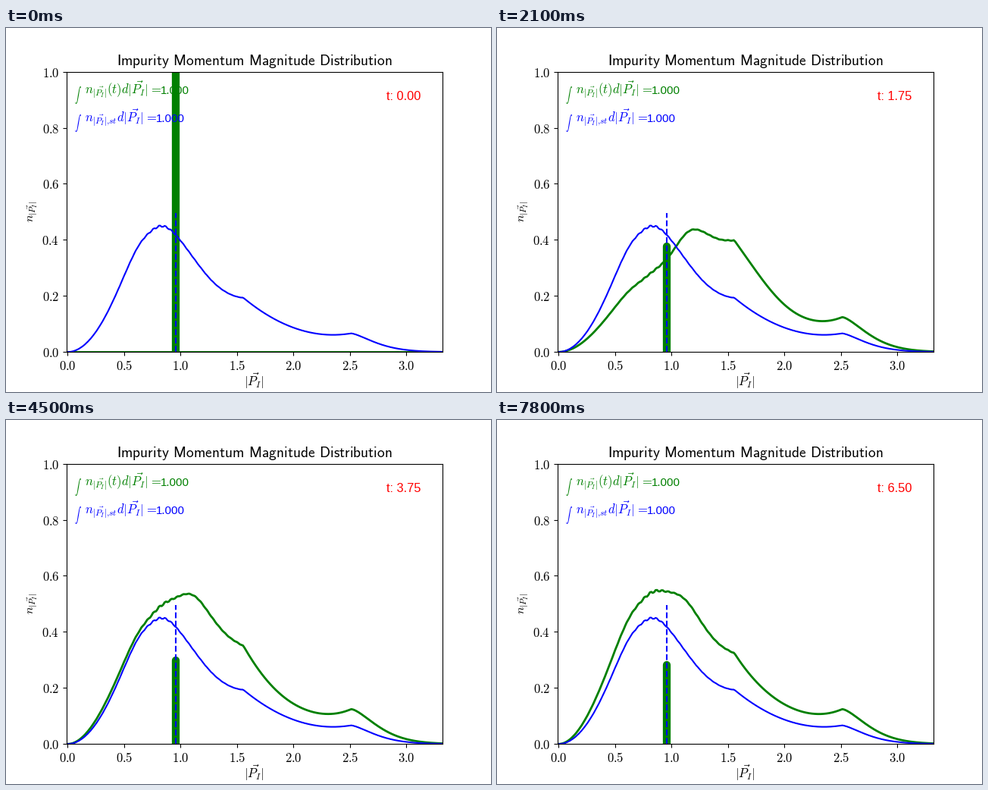
A matplotlib script for the animation above (8 s loop, 640 by 480 pixels).

```python
import matplotlib.pyplot as plt
import numpy as np
from matplotlib.animation import FuncAnimation

plt.rcParams.update({"mathtext.fontset": "cm", "font.size": 12})

INTERVAL = 100      # ms per animation frame
HOLD = 3            # animation frames per time step
STEP = 0.25         # simulated time per step
FRAMES = 80
PEAK = 0.955        # momentum of the coherent peak
KINK, BUMP, X_MAX = 1.56, 2.51, 3.32


def sigmoid(x):
    return 1 / (1 + np.exp(-x))


def bell(x, center, width):
    return np.exp(-((x - center) / width) ** 2)


def steady(x):
    """Stationary distribution: broad peak, kink, valley and cut-off tail."""
    peak = 1.15 * x ** 2 / (1 + (x / 0.88) ** 5)
    peak += 0.042 * (np.maximum(x - 1.2, 0) / (KINK - 1.2)) ** 2
    peak -= 0.012 * bell(x, 0.73, 0.1)
    valley = 0.061 + 0.21 * (np.minimum(x, BUMP) - 2.35) ** 2
    tail = np.exp(-6.2 * np.maximum(x - BUMP, 0) ** 1.45)
    rough = 0.002 + 0.006 * bell(x, 0.82, 0.12)
    ripple = 1 + rough * np.cos(2 * np.pi * (x - 0.865) / 0.053)
    return np.where(x < KINK, peak * ripple, valley * tail)


def late(x):
    """Distribution the evolving curve settles into."""
    ratio = (1.17 + 0.3 * bell(x, 0, 0.42) + 0.5 * sigmoid((x - 1.05) / 0.08)
             + 0.55 * np.maximum(x - 1.5, 0) * (x - 2.15))
    return steady(x) * ratio


def evolving(x, time):
    """High momenta fill first; an excess drifts inwards while it fades."""
    rate = 0.275 + 1.93 * sigmoid((x - 1.27) / 0.12)
    growth = 1 - np.exp(-rate * time ** 1.5)
    center = 1.25 + np.exp(-time / 2.4)
    excess = 0.83 * np.exp(-time / 1.8) * bell(x, center, 0.4)
    return late(x) * growth * (1 + excess)


def weight(time):
    """Height of the coherent peak."""
    return 0.275 + 0.725 / (1 + (time / 0.74) ** 2.1)


def pixel(x, y):
    return x / 640, 1 - y / 480


def label(x, y, text, **style):
    return fig.text(*pixel(x, y), text, va="baseline", **style)


def integral(y, integrand, end, color):
    label(90, y + 4, r"$\int$", color=color, fontsize=6.2)
    label(104, y, f"${integrand}$", color=color)
    label(end, y, "1.000", color=color, family="Liberation Sans", fontsize=10.9)


def clock(time):
    return f"t: {time:.2f}"


MOMENTUM = r"|\vec{P_I}|"
EQUALS = rf"d{MOMENTUM}\hspace{{0.12}}="

fig = plt.figure(figsize=(6.4, 4.8), dpi=100, facecolor="white")
ax = fig.add_axes([0.125, 0.11, 0.775, 0.77])
ax.set_xlim(-0.009, X_MAX)
ax.set_ylim(0, 1)
x_ticks = np.arange(0, 3.1, 0.5)
y_ticks = np.arange(0, 1.1, 0.2)
ax.set_xticks(x_ticks, [f"${v:.1f}$" for v in x_ticks])
ax.set_yticks(y_ticks, [f"${v:.1f}$" for v in y_ticks])

title = "Impurity Momentum Magnitude Distribution".replace(" ", r"\hspace{0.38}")
ax.set_title(rf"$\mathsf{{{title}}}$", fontsize=14)
label(327.5, 472.5, f"${MOMENTUM}$", ha="center")
label(36, 242, f"$n_{{{MOMENTUM}}}$", ha="center", rotation=90,
      rotation_mode="anchor", fontsize=11.5)

k = np.linspace(0, X_MAX, 260)
spectrum, = ax.plot(k, 0 * k, "g", lw=2)
bar, = ax.plot([PEAK, PEAK], [0, 1], "g", lw=7.4, solid_capstyle="round")
ax.plot(k, steady(k), "b", lw=1.5)
ax.plot([PEAK, PEAK], [0, 0.497], "b--", lw=1.5)

integral(87.2, rf"n_{{{MOMENTUM}}}(t){EQUALS}", 203.5, "g")
integral(124.1, rf"n_{{{MOMENTUM},\hspace{{-0.2}}st}}{EQUALS}", 198, "b")
time_text = label(502, 95, clock(0), color="r", family="Liberation Sans",
                  fontsize=11.8)


def update(frame):
    time = frame // HOLD * STEP
    spectrum.set_ydata(evolving(k, time))
    bar.set_ydata([0, weight(time)])
    time_text.set_text(clock(time))
    return spectrum, bar, time_text


animation = FuncAnimation(fig, update, frames=FRAMES, interval=INTERVAL,
                          repeat=True, repeat_delay=0)
plt.show()
```
